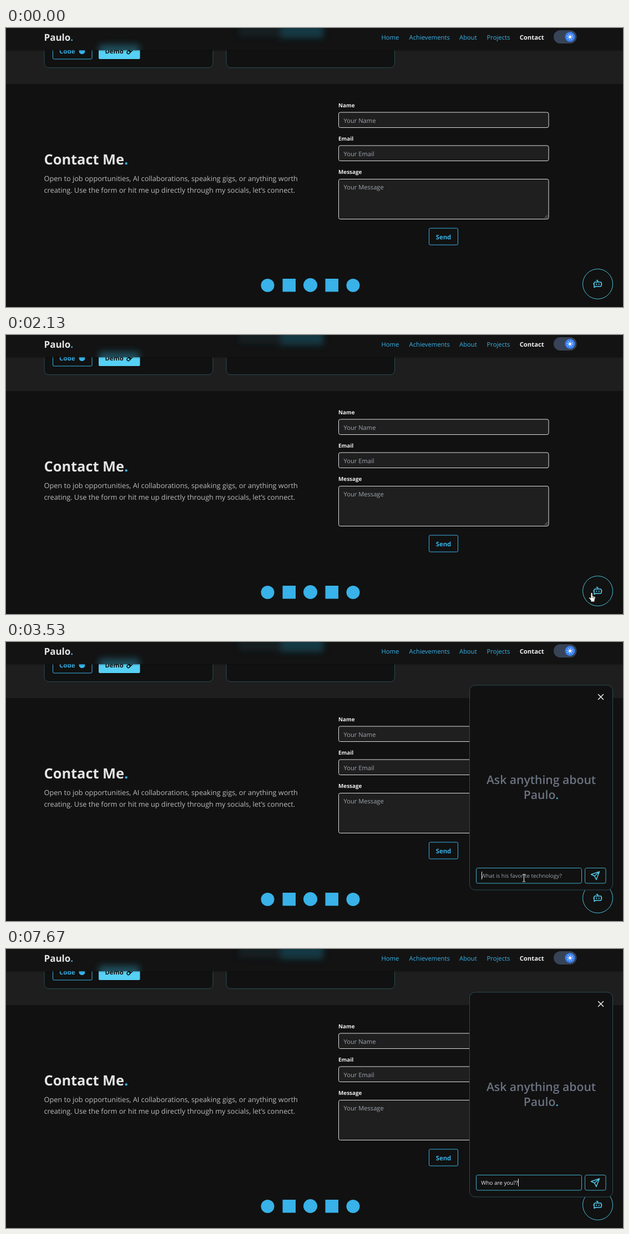
Animation, 1112 px wide and 503 px high, one loop 8000 ms. Source, as an HTML page:

```html
<!DOCTYPE html>
<html lang="en">
<head>
<meta charset="utf-8">
<title>Contact page</title>
<style>
  html, body { margin: 0; width: 100%; height: 100%; overflow: hidden; background: #111; }
  svg { display: block; width: 100%; height: 100%; }
  text { font-family: "Open Sans", "Noto Sans", sans-serif; white-space: pre; text-rendering: geometricPrecision; }
  .accent { fill: #38b2e8; }
  .line { fill: none; stroke: #52cbea; stroke-width: 1.5; stroke-linecap: round; stroke-linejoin: round; }
  .nav { font-size: 11.28px; }
  .bold { font-weight: 700; }
  .label { font-size: 9.9px; font-weight: 700; fill: #eee; }
  .field { fill: #1f1f1f; stroke: #dedede; }
  .hint { font-size: 11.15px; fill: #9ca3af; }
  .card { fill: #111; stroke: #2b4b52; }
  .small { font-size: 9.9px; }
</style>
</head>
<body>
<svg viewBox="0 0 1112 503" xmlns="http://www.w3.org/2000/svg">
  <defs>
    <filter id="soft" x="-50%" y="-100%" width="200%" height="300%"><feGaussianBlur stdDeviation="6"/></filter>
    <clipPath id="bar"><rect width="1112" height="40"/></clipPath>
  </defs>
  <rect width="1112" height="503" fill="#111"/>
  <rect width="1112" height="101" fill="#1e1e1e"/>

  <!-- project cards -->
  <rect class="card" x="69" y="-20" width="304" height="91.5" rx="8"/>
  <rect class="card" x="397" y="-20" width="303.500" height="91.5" rx="8"/>
  <rect x="84.500" y="26.500" width="70.500" height="29.500" rx="2" fill="none" stroke="#38b2e8"/>
  <text class="accent bold" x="96" y="46" font-size="11.5">Code</text>
  <circle class="accent" cx="137" cy="41.500" r="5.500"/>
  <rect x="167" y="26" width="74.500" height="30" rx="2" fill="#56d0f4"/>
  <text class="bold" x="178.500" y="46" font-size="11.3" fill="#111">Demo</text>
  <g fill="none" stroke="#111" stroke-width="1.600" transform="translate(223 41.500) rotate(-45)">
    <rect x="-6" y="-2.500" width="7" height="5" rx="2.500"/>
    <rect x="-1" y="-2.500" width="7" height="5" rx="2.500"/>
  </g>

  <!-- header -->
  <rect y="40" width="1112" height="2" fill="#000" opacity=".18"/>
  <rect width="1112" height="40" fill="#131313"/>
  <g clip-path="url(#bar)" filter="url(#soft)">
    <rect x="494" y="-10" width="78" height="28" fill="#1c6076" opacity=".5"/>
    <rect x="420" y="-10" width="70" height="26" fill="#17323a" opacity=".4"/>
    <rect x="168" y="30" width="72" height="20" fill="#2b7f98" opacity=".55"/>
  </g>
  <text class="bold" x="68.500" y="23" font-size="17" fill="#e5e5e5">Paulo<tspan class="accent">.</tspan></text>
  <g class="nav accent">
    <text x="676.500" y="20.500">Home</text>
    <text x="726.500" y="20.500">Achievements</text>
    <text x="817" y="20.500">About</text>
    <text x="866.500" y="20.500">Projects</text>
  </g>
  <text class="nav bold" x="925.700" y="20.500" fill="#f2f2f2">Contact</text>
  <rect x="987" y="4" width="41.500" height="24" rx="12" fill="#374357"/>
  <circle cx="1016.500" cy="16" r="9" fill="#3b82f6"/>
  <circle cx="1016.500" cy="16" r="2.600" fill="#fff"/>
  <circle cx="1016.500" cy="16" r="4.500" fill="none" stroke="#fff" stroke-width="1.600" stroke-dasharray="1.100 2.434"/>

  <!-- contact section -->
  <text class="bold" x="68.500" y="245.500" font-size="25.4" fill="#e3e3e3">Contact Me<tspan class="accent">.</tspan></text>
  <g font-size="12.72" fill="#bcbcbc">
    <text x="68.500" y="276.300">Open to job opportunities, AI collaborations, speaking gigs, or anything worth</text>
    <text x="68.500" y="297.200">creating. Use the form or hit me up directly through my socials, let’s connect.</text>
  </g>
  <text class="label" x="599" y="142.700">Name</text>
  <rect class="field" x="599.500" y="152" width="378.500" height="27.500" rx="3"/>
  <text class="hint" x="608.500" y="170.700">Your Name</text>
  <text class="label" x="599" y="202.700">Email</text>
  <rect class="field" x="599.500" y="212" width="378.500" height="27.500" rx="3"/>
  <text class="hint" x="608.500" y="230.700">Your Email</text>
  <text class="label" x="599" y="263">Message</text>
  <rect class="field" x="599.500" y="272.500" width="378.500" height="72" rx="3"/>
  <text class="hint" x="608.500" y="291.200">Your Message</text>
  <path d="M971 342.500l5-5M974 342.500l2-2" stroke="#aaa" stroke-width=".9"/>
  <rect id="send" x="762.500" y="361" width="52" height="30" rx="2" stroke="#38b2e8"/>
  <text id="sendText" class="bold" x="788.500" y="380.700" font-size="11.3" text-anchor="middle">Send</text>

  <!-- social links -->
  <g class="accent">
    <circle cx="471.500" cy="464" r="12"/>
    <rect x="498.500" y="452" width="23.500" height="23.500"/>
    <circle cx="548.500" cy="463.500" r="12.500"/>
    <rect x="575.500" y="452" width="23.500" height="23.500"/>
    <circle cx="625.500" cy="464" r="12"/>
  </g>

  <!-- chat launcher -->
  <circle id="chat" cx="1066.500" cy="461.500" r="27" stroke="#4cc3dd"/>
  <g id="bot" class="line">
    <path d="M1064 455h2.500v3M1060 467.500v-7.500q0-2 2-2h9q2 0 2 2v4q0 2-2 2h-8.500zM1058.600 461.500h1M1073 461.500h1M1064.300 461.200v1.500M1068.700 461.200v1.500"/>
  </g>

  <!-- chat panel -->
  <g id="panel">
    <rect class="card" x="835.500" y="78" width="258" height="369" rx="10"/>
    <path d="M1067.500 94.500l9 9m0-9l-9 9" stroke="#eee" stroke-width="1.500" stroke-linecap="round"/>
    <g font-size="21.150" font-weight="600" text-anchor="middle" fill="#6b7280">
      <text x="964.500" y="256">Ask anything about</text>
      <text x="964.500" y="283">Paulo<tspan class="accent">.</tspan></text>
    </g>
    <rect id="input" x="847.500" y="407.500" width="190" height="27.500" rx="3" fill="#111"/>
    <text id="prompt" class="small" x="856.300" y="425.300" fill="#9ca3af">What is his favorite technology?</text>
    <text id="typed" class="small" x="856.300" y="425.300" fill="#ececec"></text>
    <rect id="caret" y="414" width="1" height="14" fill="#e5e5e5"/>
    <rect x="1043.500" y="407.500" width="37.500" height="27.500" rx="3" fill="#111" stroke="#3fb0cc"/>
    <path class="line" d="M1069.500 414l-15 5 6.300 3 3 6.500zM1060.800 422l8.700-8"/>
  </g>

  <g id="pointer" stroke-linejoin="round">
    <path id="arrow" d="M0 0V13.500L3 10.800 5 15.500 7.200 14.600 5.200 10H9.300Z" fill="#fff" stroke="#111" stroke-width=".8"/>
    <path id="hand" d="M-1.500 1.200Q0-1 1.500 1.200V6l4 1.200q1.300.5 1.100 2L5.300 13V16.500H-1.500V14L-4.800 9.800q-.3-1.600 1.200-1.500l2.100 1.700zM2 7v3M4 7.800v2.400" fill="#fff" stroke="#111" stroke-width=".8"/>
    <path id="beam" d="M-2.500-6.500h2L0-6 .5-6.500h2M0-6V6M-2.500 6.500h2L0 6l.5.500h2" fill="none" stroke="#fff"/>
  </g>
</svg>
<script>
const LOOP = 8000, TICK = 1000 / 15, FADE = 150;
const OPEN = 2395, FOCUS = 3330, BLINK = 530;
const el = Object.fromEntries([...document.querySelectorAll("[id]")].map(n => [n.id, n]));

// time, x, y
const path = [
  [66, 1106, 496], [330, 1040, 462], [600, 960, 412], [867, 920, 390],
  [933, 862, 380], [1000, 800.5, 372], [1267, 798, 373], [1400, 835, 388],
  [1733, 985, 444], [2133, 1055.5, 464.5], [2267, 1066, 462], [2600, 1066, 462],
  [2733, 1000, 394], [2867, 918, 354], [2933, 901, 368], [3000, 908, 402],
  [3067, 933.5, 425.5], [7400, 933.5, 425.5], [7600, 1084, 338]
];
// time, number of characters typed
const keys = [
  [4130, 1], [4400, 2], [4530, 3], [4600, 4], [4730, 5], [4870, 6], [5000, 7],
  [5270, 9], [5400, 10], [5530, 11], [6200, 12], [6400, 13]
];
const message = "Who are you??";

const clamp = v => Math.max(0, Math.min(1, v));
const show = (node, on) => node.setAttribute("visibility", on ? "inherit" : "hidden");
const hover = (t, on, off) => clamp((t - on) / FADE) - clamp((t - off) / FADE);
const mix = (a, b, p) => `rgb(${a.map((v, i) => Math.round(v + (b[i] - v) * p))})`;
const DARK = [17, 17, 17], CYAN = [86, 208, 244], BLUE = [56, 178, 232];

function position(t) {
  const next = path.findIndex(p => p[0] > t);
  if (next < 1) return path[next ? path.length - 1 : 0].slice(1);
  const [t0, x0, y0] = path[next - 1], [t1, x1, y1] = path[next];
  const p = (t - t0) / (t1 - t0);
  return [x0 + (x1 - x0) * p, y0 + (y1 - y0) * p];
}

function drawPointer(t) {
  const [x, y] = position(t);
  const inside = (l, top, r, b) => x > l && x < r && y > top && y < b;
  const overInput = t > OPEN && inside(847, 407, 1038, 435);
  const overButton = inside(762, 361, 815, 391) && t < OPEN ||
    Math.hypot(x - 1066.5, y - 461.5) < 27 && !(t > OPEN && y < 447);
  const overField = t < OPEN && inside(599, 272, 978, 345);
  const shape = overInput || overField ? "beam" : overButton ? "hand" : "arrow";
  for (const name of ["arrow", "hand", "beam"]) show(el[name], name === shape);
  el.pointer.setAttribute("transform", `translate(${x} ${y})`);
  show(el.pointer, t > 60 && t < 7660 && !(t > FOCUS && t < 3530));
}

function drawInput(t) {
  const pressed = keys.filter(k => k[0] <= t).pop();
  const focused = t >= FOCUS;
  el.typed.textContent = pressed ? message.slice(0, pressed[1]) : "";
  show(el.prompt, !pressed);
  el.input.setAttribute("stroke", focused ? "#3fb0cc" : "#dedede");
  const since = t - (pressed ? pressed[0] : FOCUS + 60);
  show(el.caret, focused && since % (2 * BLINK) < BLINK);
  el.caret.setAttribute("x", Math.round(856.5 + el.typed.getComputedTextLength()));
}

function draw(time) {
  const t = Math.floor((time + 3.4) / TICK) * TICK + 0.5;
  const send = hover(t, 1000, 1333), chat = hover(t, 2133, 2640);
  el.send.setAttribute("fill", mix(DARK, CYAN, send));
  el.sendText.setAttribute("fill", mix(BLUE, DARK, send));
  el.chat.setAttribute("fill", mix(DARK, CYAN, chat));
  el.bot.style.stroke = mix(CYAN, DARK, chat);
  show(el.panel, t >= OPEN);
  drawInput(t);
  drawPointer(t);
}

function frame() {
  draw(performance.now() % LOOP);
  requestAnimationFrame(frame);
}
frame();
</script>
</body>
</html>
```
